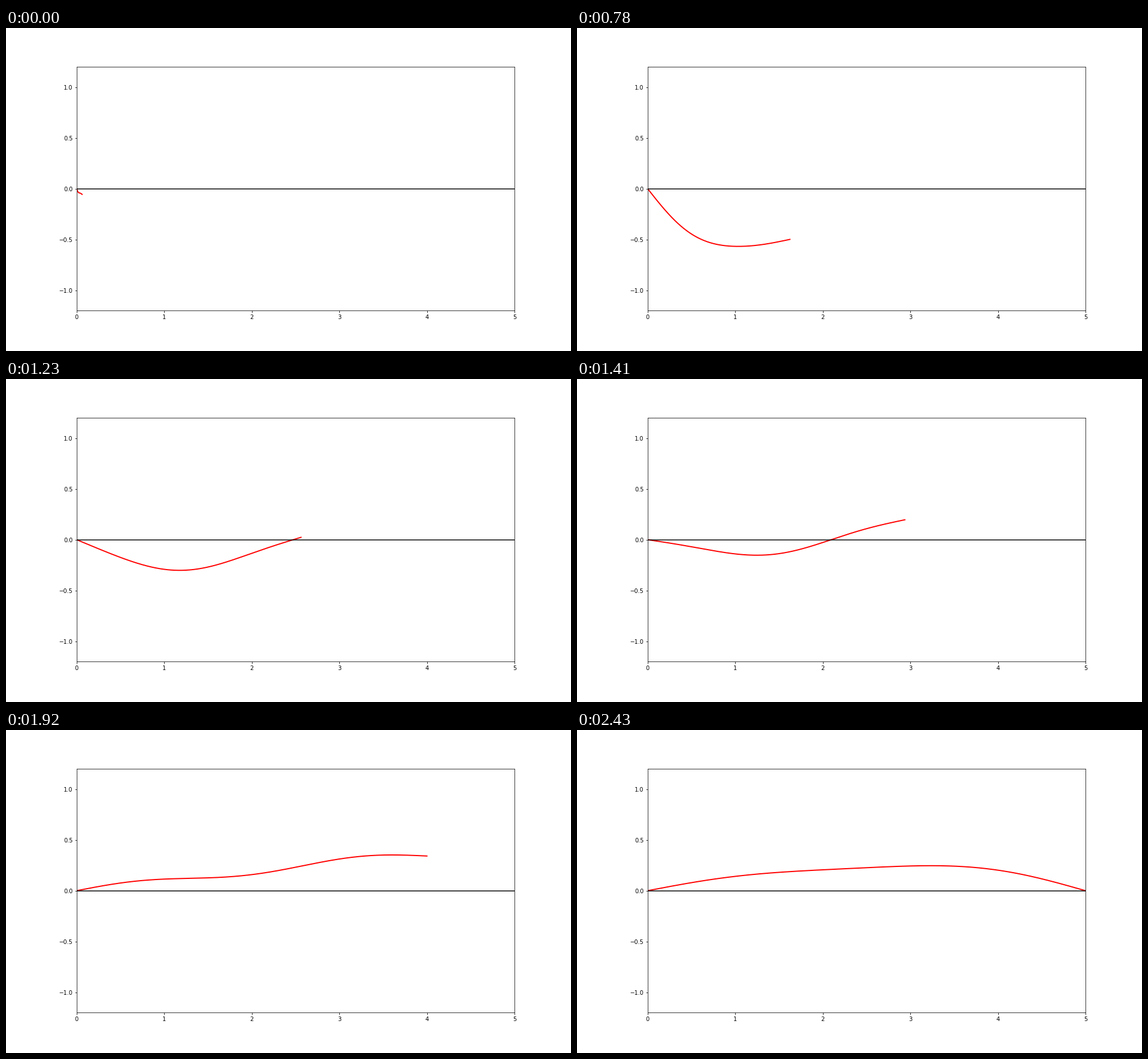
Write a matplotlib script that moves like this. It is 990 px wide and 566 px high and loops after 2460 ms.

```python
import numpy as np
import matplotlib.pyplot as plt
from matplotlib.animation import FuncAnimation

WIDTH, HEIGHT, DPI = 990, 566, 72
FRAMES, INTERVAL = 82, 30
LENGTH, STEPS = 5, 80
S = np.linspace(0, 1, 300)


def front(n):
    """Place of the moving tip, in whole steps along the axis."""
    steps = int(n * STEPS / (FRAMES - 1) + 0.83)
    return max(steps, 1) * LENGTH / STEPS


def tip_height(t):
    phase = np.pi * t / LENGTH
    return -(0.095 * np.sin(phase) + 0.486 * np.sin(2 * phase)
             + 0.085 * np.sin(3 * phase) + 0.027 * np.sin(4 * phase))


def sag(t):
    """Amplitude of the main arch: falls, turns smoothly and rises."""
    d = t - 2.1
    return 0.212 * np.hypot(d, 0.25) + 0.017 * d - 0.415


def skew(t):
    return -0.12 * t * np.exp(-t) - 0.028 * (t / LENGTH)**8


def ripple(t):
    return 0.005 * t - 0.017 * np.sin(2 * np.pi * t / LENGTH)


def height(t):
    """Straight line to the tip plus three arches that vanish at both ends."""
    arches = (sag(t), skew(t), ripple(t))
    return tip_height(t) * S + sum(
        a * np.sin(k * np.pi * S) for k, a in enumerate(arches, 1))


plt.rcParams["font.family"] = "DejaVu Sans"
fig, ax = plt.subplots(figsize=(WIDTH / DPI, HEIGHT / DPI), dpi=DPI,
                       facecolor="white")
fig.subplots_adjust(left=0.125, right=0.9, bottom=0.125, top=0.88)
ax.set_xlim(0, LENGTH)
ax.set_ylim(-1.2, 1.2)
ax.set_yticks(np.arange(-1, 1.1, 0.5))
curve, = ax.plot([], [], color="red", lw=2)
ax.plot([0, LENGTH], [0, 0], color="black", lw=1.5)


def update(n):
    t = front(n)
    curve.set_data(S * t, height(t))
    return curve,


anim = FuncAnimation(fig, update, frames=FRAMES, interval=INTERVAL,
                     init_func=lambda: update(0), repeat=True, repeat_delay=0)
plt.show()
```
